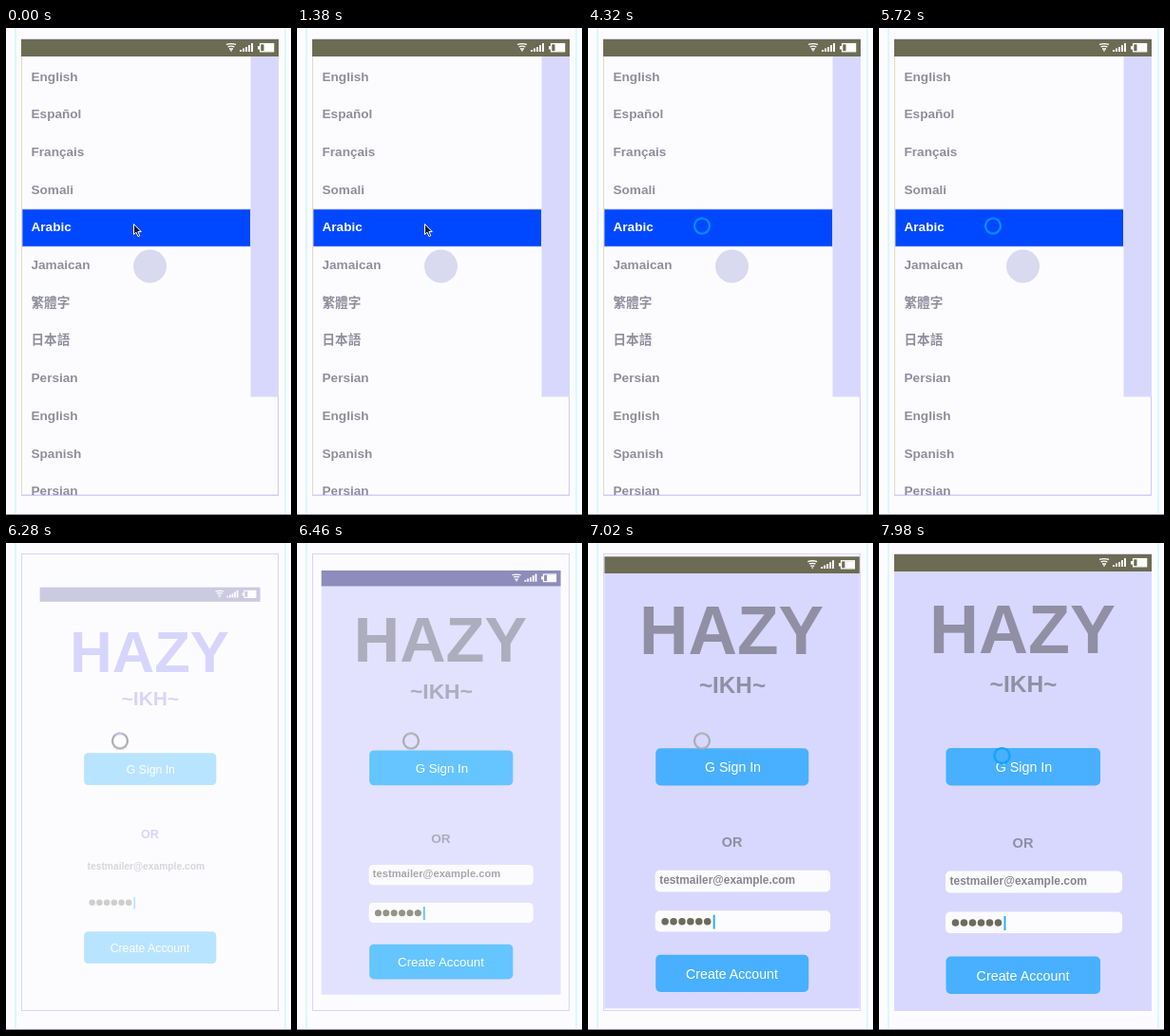
Animation, 300 px wide and 513 px high, one loop 8000 ms. Source, as an HTML page:

```html
<!DOCTYPE html>
<html lang="en">
<head>
<meta charset="utf-8">
<title>Language picker to sign-in</title>
<style>
  html, body { margin: 0; width: 100%; height: 100%; overflow: hidden; background: #fcfcff; }
  svg { display: block; width: 300px; height: 513px; }
  text { font-family: "Liberation Sans", Arial, sans-serif; }
  .bold { font-weight: 700; }
  .row { font: 700 13.6px "Liberation Sans", "Noto Sans CJK TC", "Noto Sans CJK JP", "Noto Sans CJK", sans-serif; fill: #8f8e9c; }
  .row.selected { fill: #fff; }
  .mid { text-anchor: middle; }
  .heading { fill: #908fa8; }
  .button { fill: #48b0ff; }
  .label { font-size: 14.3px; fill: #fff; }
  .field { fill: #fcfcff; }
  .bar { fill: #6c6c54; }

  .list, .login, .arrow, .busy, .ring, .glint, .login .heading, .login .button, .login .bar, .backdrop {
    animation: 8s linear infinite;
  }
  .list { animation-name: list-out; }
  .login { animation-name: login-fade, login-zoom; transform-origin: 151.5px 252px; }
  .login .heading { animation-name: heading-tint; }
  .login .button { animation-name: button-tint; }
  .login .bar { animation-name: bar-tint; }
  .backdrop { animation-name: backdrop-tint; }
  .arrow { animation-name: arrow; }
  .busy { animation-name: busy, busy-move; }
  .ring { animation-name: ring-tint; }
  .glint { animation-name: glint, spin; animation-duration: 8s, 1s; }

  @keyframes list-out {
    0%, 73.5% { opacity: 1; }
    77.5%, 100% { opacity: 0; }
  }
  @keyframes login-fade {
    0%, 76.75% { opacity: 0; }
    78.5% { opacity: .32; }
    80.75% { opacity: .72; }
    82.75%, 100% { opacity: 1; }
  }
  @keyframes login-zoom {
    0%, 76.75% { transform: scale(.76); }
    78.5% { transform: scale(.856); animation-timing-function: cubic-bezier(.33, .45, .67, .8); }
    80.75% { transform: scale(.93); animation-timing-function: cubic-bezier(.33, .53, .67, .78); }
    83.75% { transform: scale(.966); animation-timing-function: cubic-bezier(.33, .73, .67, 1); }
    92.5%, 100% { transform: scale(1); }
  }
  @keyframes heading-tint {
    0%, 78.5% { fill: #8c84f4; }
    80.75%, 100% { fill: #908fa4; }
  }
  @keyframes button-tint {
    0%, 80.75% { fill: #2cb0ff; }
    83%, 100% { fill: #48b0ff; }
  }
  @keyframes bar-tint {
    0%, 83.75% { fill: #6462a0; }
    86%, 100% { fill: #6c6c54; }
  }
  @keyframes backdrop-tint {
    0%, 78.5% { fill: #fcfcff; }
    80.75%, 100% { fill: #d8d8ff; }
  }
  @keyframes arrow {
    0%, 35.74% { opacity: 1; }
    35.75%, 100% { opacity: 0; }
  }
  @keyframes busy {
    0%, 35.74% { opacity: 0; }
    35.75%, 100% { opacity: 1; }
  }
  @keyframes busy-move {
    0%, 94.25% { transform: translate(120px, 208.5px); animation-timing-function: ease-in-out; }
    99.5%, 100% { transform: translate(129.5px, 224px); }
  }
  @keyframes ring-tint {
    0%, 75% { stroke: #0a94ff; }
    77.5%, 93.5% { stroke: #aaaaac; }
    95%, 100% { stroke: #10a0fc; }
  }
  @keyframes glint {
    0%, 76.5% { opacity: 0; }
    77.5%, 79.5% { opacity: 1; }
    80.5%, 100% { opacity: 0; }
  }
  @keyframes spin { to { transform: rotate(360deg); } }
</style>
</head>
<body>
<svg viewBox="0 0 300 513">
  <defs>
    <clipPath id="phone"><rect x="16" y="12" width="271" height="480.5"/></clipPath>
    <g id="icons">
      <g fill="none" stroke="#fff" stroke-width="1.3">
        <path d="M232 17.4Q237 15.8 242 17.4M233.6 19.8Q237 18.6 240.4 19.8M235 22H239"/>
        <rect x="267.6" y="16.6" width="14" height="8.2"/>
      </g>
      <path fill="#fff" d="M235.8 23.3h2.4l-1.2 2zM246 23h2v2h-2zM249 21.5h2v3.5h-2zM252 20h2v5h-2zM255 18h2v7h-2zM258 16h2v9h-2zM265 19h2v3.5h-2zM271.5 17h10v7.5h-10z"/>
    </g>
  </defs>

  <rect width="300" height="513" fill="#fcfcff"/>
  <path d="M10 0V511M294 0V511" stroke="#dcf8fc" stroke-width="2"/>
  <path d="M0 512.5H300" stroke="#8c8ca8"/>
  <rect x="16.5" y="11.5" width="270" height="481" fill="none" stroke="#d8d4fa"/>

  <g clip-path="url(#phone)">
    <g class="list">
      <rect x="257.5" y="30" width="29.5" height="358.5" fill="#d8d8fc"/>
      <rect class="bar" x="16" y="12" width="271" height="18"/>
      <use href="#icons"/>
      <path d="M16.5 30V492" stroke="#dcdcc4"/>
      <path d="M16 492H287M286.6 388V492" stroke="#d0c8f8"/>
      <rect x="17" y="190.5" width="240.5" height="40" fill="#b4c0f0"/>
      <rect x="17.5" y="191.3" width="239.5" height="38.5" fill="#0048ff"/>
      <g id="rows"></g>
      <circle cx="151.5" cy="251" r="17.5" fill="#d9d9ef"/>
    </g>

    <g class="login">
      <rect class="backdrop" x="16" y="12" width="271" height="480.5"/>
      <rect class="bar" x="16" y="12" width="271" height="18"/>
      <use href="#icons"/>
      <text class="heading bold mid" x="151" y="116" font-size="72">HAZY</text>
      <text class="heading bold mid" x="152" y="157" font-size="24.5">~IKH~</text>
      <rect class="button" x="70.5" y="216" width="162.5" height="39.5" rx="5"/>
      <text class="label mid" x="152.5" y="241">G Sign In</text>
      <text class="heading bold mid" x="151.5" y="321" font-size="14.6">OR</text>
      <rect class="field" x="70" y="345.5" width="186" height="23" rx="5"/>
      <text class="bold" x="74.5" y="359.5" font-size="12" fill="#86858c">testmailer@example.com</text>
      <rect class="field" x="70" y="388.5" width="186" height="22.5" rx="5"/>
      <path d="M80.5 400H126" stroke="#6c6c5c" stroke-width="7.6" stroke-linecap="round" stroke-dasharray="0 9"/>
      <rect x="131.5" y="393" width="2" height="15" fill="#30acff"/>
      <rect class="button" x="70.5" y="435.5" width="162.5" height="39.5" rx="5"/>
      <text class="label mid" x="151.5" y="460.5">Create Account</text>
    </g>
  </g>

  <path class="arrow" d="M134.5 206.5V217.5L137 215.2L139 219.6L140.8 218.8L138.9 214.6H142.3Z" fill="#101830" stroke="#fff"/>
  <g class="busy" fill="none" stroke-width="2.2">
    <circle class="ring" r="8"/>
    <path class="glint" d="M-5.66 5.66A8 8 0 0 1 -8 0" stroke="#c4bcf8"/>
  </g>
</svg>
<script>
  const languages = ["English", "Español", "Français", "Somali", "Arabic", "Jamaican",
    "繁體字", "日本語", "Persian", "English", "Spanish", "Persian"];
  const rows = document.getElementById("rows");
  languages.forEach((name, i) => {
    const row = document.createElementNS("http://www.w3.org/2000/svg", "text");
    row.setAttribute("class", name === "Arabic" ? "row selected" : "row");
    row.setAttribute("x", 26.5);
    row.setAttribute("y", 55.5 + i * 39.7);
    row.textContent = name;
    rows.append(row);
  });
</script>
</body>
</html>
```
